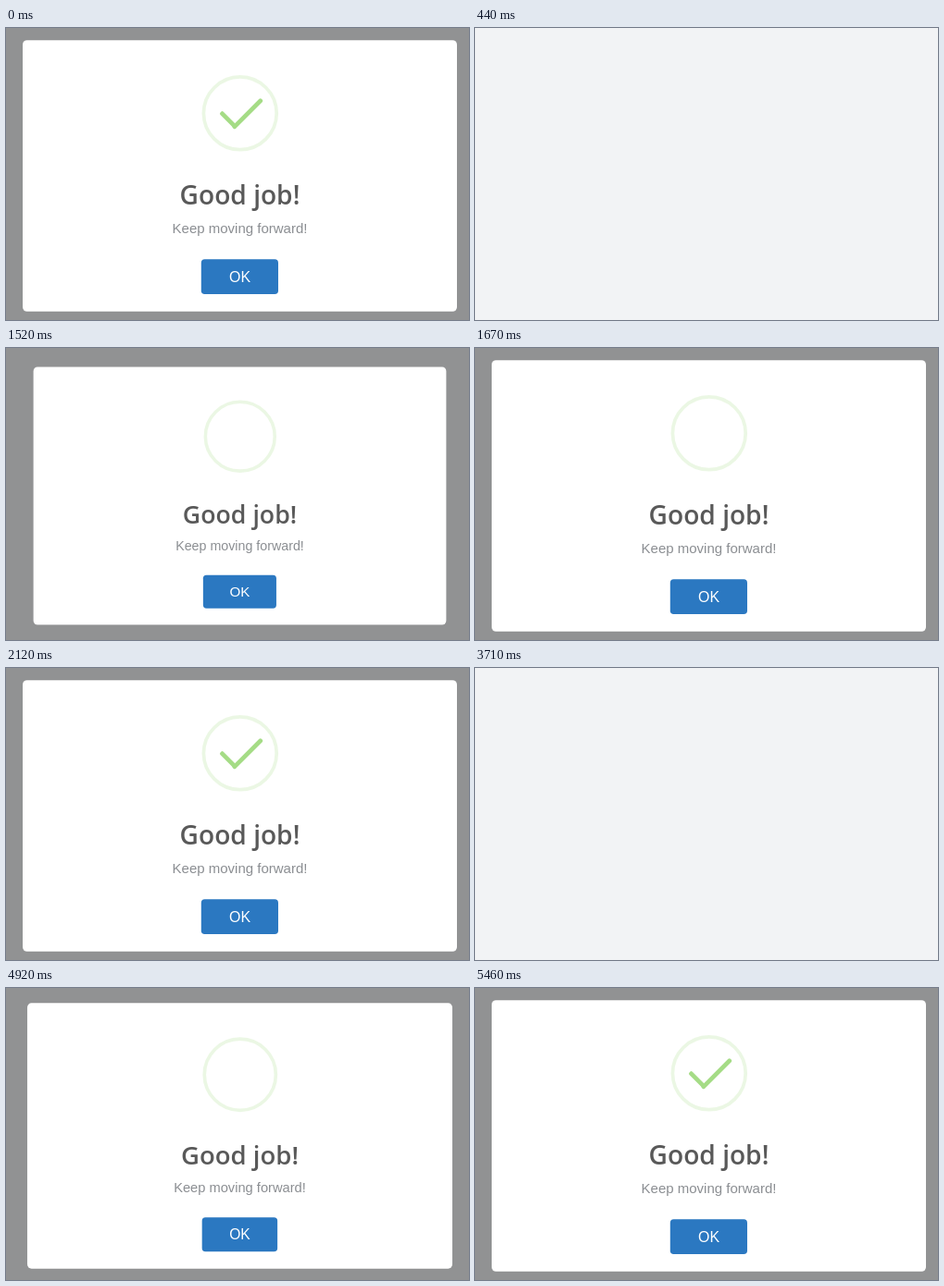
Write an HTML page that moves like this. It is 500 by 316 pixels and loops after 5740 ms.

```html
<!DOCTYPE html>
<html lang="en">
<head>
<meta charset="utf-8">
<title>Success dialog</title>
<style>
  html, body { margin: 0; width: 100%; height: 100%; overflow: hidden; background: #f2f3f5; }
  svg { display: block; width: 100vw; height: 100vh; }
  text { text-anchor: middle; }
  .title { font: 600 28.1px "Open Sans", sans-serif; fill: #595959; }
  .body { font: 15px "Liberation Sans", Arial, sans-serif; fill: #8b8e92; }
  .label { font: 15.95px "Liberation Sans", Arial, sans-serif; fill: #fff; }
</style>
</head>
<body>
<svg viewBox="0 0 500 316">
  <rect width="500" height="316" fill="#f2f3f5"/>
  <g id="dialog">
    <rect width="500" height="316" fill="#919293"/>
    <g id="modal">
      <rect x="18" y="13.2" width="469" height="293.6" rx="4.7" fill="#fff"/>
      <g transform="translate(215.3 54.8) scale(.938)">
        <circle cx="40" cy="40" r="42" fill="none" stroke="#a5dc86" stroke-opacity=".22" stroke-width="4"/>
        <rect id="tip" height="5" rx="2" fill="#a5dc86"/>
        <rect id="long" height="5" rx="2" fill="#a5dc86"/>
      </g>
      <text class="title" x="252.5" y="191.3">Good job!</text>
      <text class="body" x="252.5" y="222.3">Keep moving forward!</text>
      <rect x="210.8" y="250.2" width="83.2" height="37.8" rx="3.8" fill="#2b78c1"/>
      <text class="label" x="252.5" y="274.5">OK</text>
    </g>
  </g>
</svg>
<script>
const LOOP = 5740;
const $ = id => document.getElementById(id);

// Each run: when the dialog hides, when its clock starts, and its redraw times.
const runs = [
  { hide: 440, start: 1290, steps: [1400, 1520, 1670, 1820, 1970, 2120] },
  { hide: 3710, start: 4660, steps: [4800, 4920, 5060, 5190, 5340, 5460] }
];

// Keyframes: [fraction, ...values]
const popKeys = [[0, .7], [.45, 1.05], [.8, .95], [1, 1]];
// Strokes: [fraction, left, top, width]
const tipKeys = [[0, 1, 19, 0], [.54, 1, 19, 0], [.7, -8, 37, 50], [.84, 21, 48, 17], [1, 14, 45, 25]];
const longKeys = [[0, 34, 54, 0], [.65, 34, 54, 0], [.84, 25, 35, 55], [1, 25, 38, 47]];

const bezier = (a, b, u) => 3 * a * u * (1 - u) ** 2 + 3 * b * u * u * (1 - u) + u ** 3;

// cubic-bezier(.25, .1, .25, 1)
function ease(x) {
  let lo = 0, hi = 1;
  for (let i = 0; i < 24; i++) {
    const mid = (lo + hi) / 2;
    if (bezier(.25, .25, mid) < x) lo = mid; else hi = mid;
  }
  return bezier(.1, 1, lo);
}

function sample(keys, p) {
  const last = keys[keys.length - 1];
  if (p >= 1) return last.slice(1);
  const i = keys.findIndex(k => k[0] > p);
  const a = keys[i - 1], b = keys[i];
  const e = ease((p - a[0]) / (b[0] - a[0]));
  return a.slice(1).map((v, n) => v + (b[n + 1] - v) * e);
}

function placeStroke(el, keys, p, angle) {
  const [x, y, w] = sample(keys, p);
  el.setAttribute("x", x);
  el.setAttribute("y", y);
  el.setAttribute("width", w);
  el.setAttribute("transform", `rotate(${angle} ${x + w / 2} ${y + 2.5})`);
}

// Milliseconds since the dialog opened, or -1 while it is closed.
function dialogClock(t) {
  const run = runs.filter(r => t >= r.hide).pop();
  if (!run) return Infinity;
  const step = run.steps.filter(s => t >= s).pop();
  return step === undefined ? -1 : step - run.start;
}

function draw(t) {
  const ms = dialogClock(t);
  $("dialog").setAttribute("visibility", ms < 0 ? "hidden" : "visible");
  if (ms < 0) return;
  const [k] = sample(popKeys, ms / 300);
  $("modal").setAttribute("transform", `translate(252.5 160) scale(${k}) translate(-252.5 -160)`);
  placeStroke($("tip"), tipKeys, ms / 750, 45);
  placeStroke($("long"), longKeys, ms / 750, -45);
}

const begin = performance.now();
function tick() {
  draw((performance.now() - begin) % LOOP);
  requestAnimationFrame(tick);
}
tick();
</script>
</body>
</html>
```
